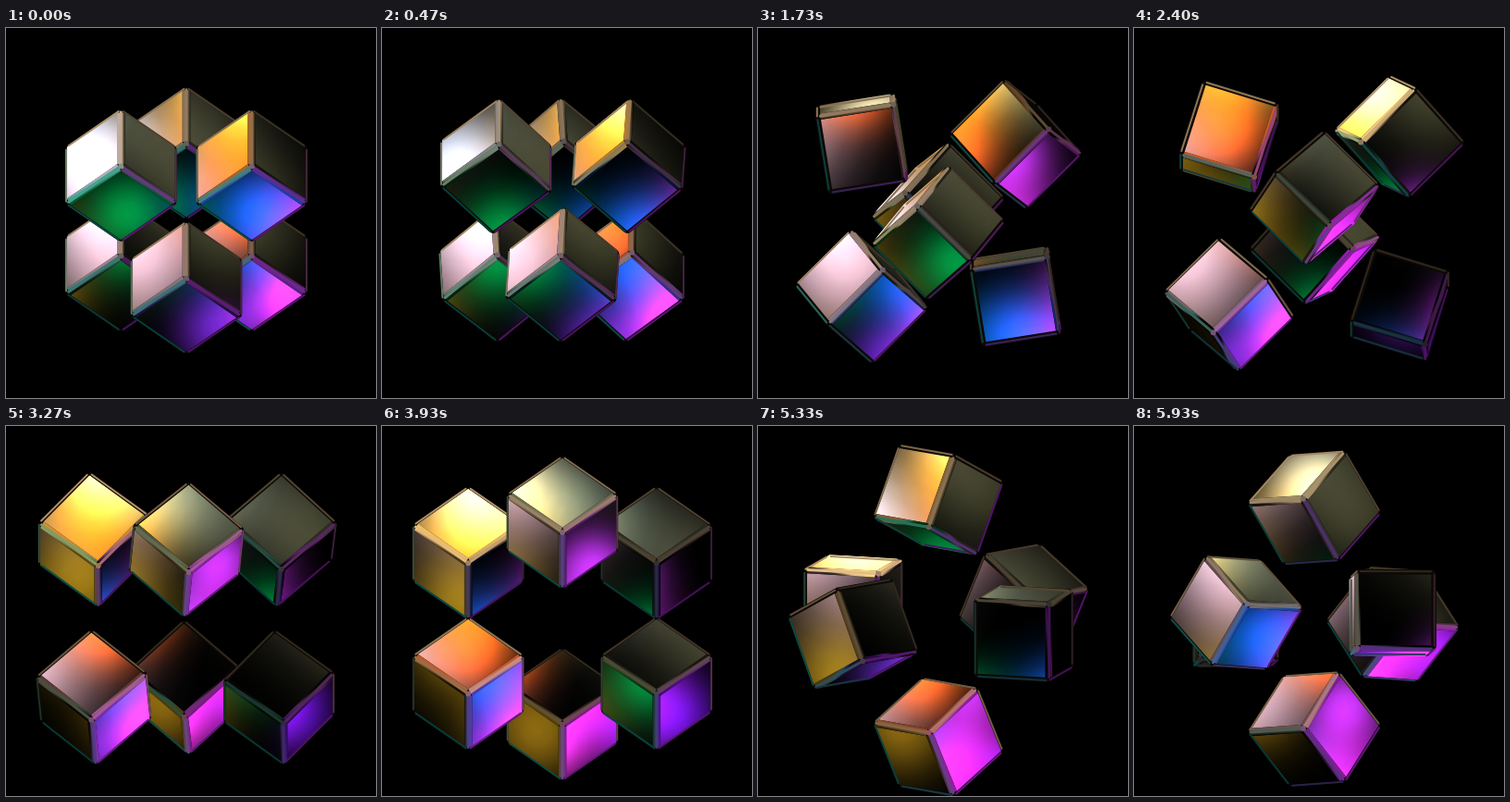
An HTML page with a canvas that plays this animation: 400x400 px, repeating every 6 s.

```html
<!DOCTYPE html>
<html lang="en">
<head>
<meta charset="utf-8">
<title>Cubes</title>
<style>
html, body { margin: 0; width: 100%; height: 100%; overflow: hidden; background: #000; }
canvas { display: block; width: 400px; height: 400px; }
</style>
</head>
<body>
<canvas id="stage" width="400" height="400"></canvas>
<script>
const ctx = document.getElementById('stage').getContext('2d');
const LOOP = 6000, FPS = 15;
const CX = 195, CY = 208, HALF = 44.3, R = 6, IN = HALF - R;
const PARALLAX = 280, SPREAD = 200;

// Axes: A right, P pole, B left; capital is the positive side, small the negative.
const cubes = [
  { at: 'P', spin: 'B' }, { at: 'p', spin: 'b' },
  { at: 'B', spin: 'P' }, { at: 'b', spin: 'P' },
  { at: 'A', spin: 'A' }, { at: 'a', spin: 'a' }
];

const hex = s => [...s].map(c => parseInt(c, 16) * 17);
const light = (x, y, r, color) => ({ x, y, r, color: hex(color) });

// Soft lights around the scene, placed by the direction a surface faces.
const lights = [
  light(-0.82, -0.3, 0.4, 'fcd'),
  light(-1, -0.7, 0.3, 'cde'),
  light(-0.36, -0.85, 0.3, 'f90'),
  light(-0.33, -0.48, 0.2, 'd41'),
  light(-0.35, -1.15, 0.25, 'ffd'),
  light(0, -1, 0.3, '787'),
  light(0.5, -0.75, 0.35, '443'),
  light(0.8, -0.4, 0.3, '332'),
  light(-0.95, 0.4, 0.28, '971'),
  light(-0.68, 0.85, 0.25, '861'),
  light(-0.22, 0.6, 0.22, '094'),
  light(0.28, 0.6, 0.24, '06e'),
  light(0.64, 0.68, 0.3, 'f3f'),
  light(0.45, 0.95, 0.18, 'e3d'),
  light(0.72, 0.25, 0.2, 'b3e'),
  light(1, 0.8, 0.22, '61d'),
  light(0.15, 1.05, 0.2, '62b')
];

const add = (p, q, k = 1) => p.map((v, i) => v + q[i] * k);
const scale = (p, k) => p.map(v => v * k);
const mix = (p, q, k) => p.map((v, i) => v + (q[i] - v) * k);
const cross = (p, q) => [p[1] * q[2] - p[2] * q[1], p[2] * q[0] - p[0] * q[2], p[0] * q[1] - p[1] * q[0]];
const dot = (p, q) => p[0] * q[0] + p[1] * q[1] + p[2] * q[2];
const clamp = v => Math.max(0, Math.min(1, v));
const css = (c, a = 1) => `rgba(${c.map(v => Math.round(255 * clamp(v / 255))).join()},${a})`;
const luma = c => clamp((c[0] * 0.3 + c[1] * 0.59 + c[2] * 0.11) / 255);

// Direction used to look up the lights, shifted by where the cube stands.
const facing = (n, pos) => [n[0] + (pos[0] - CX) / PARALLAX, n[1] + (pos[1] - CY) / PARALLAX];

function sample([x, y]) {
  return lights.reduce((sum, l) =>
    add(sum, l.color, Math.exp(-((x - l.x) ** 2 + (y - l.y) ** 2) / l.r ** 2)), [0, 0, 0]);
}

function rotate(v, axis, angle) {
  const c = Math.cos(angle), s = Math.sin(angle);
  return add(add(scale(v, c), cross(axis, v), s), axis, dot(axis, v) * (1 - c));
}

function trace(points) {
  ctx.beginPath();
  points.forEach(p => ctx.lineTo(p[0], p[1]));
  ctx.closePath();
}

function hull(points) {
  const turn = (o, a, b) => (a[0] - o[0]) * (b[1] - o[1]) - (a[1] - o[1]) * (b[0] - o[0]);
  const half = list => {
    const out = [];
    for (const p of list) {
      while (out.length > 1 && turn(out[out.length - 2], out[out.length - 1], p) <= 0) out.pop();
      out.push(p);
    }
    return out.slice(0, -1);
  };
  const sorted = [...points].sort((a, b) => a[0] - b[0] || a[1] - b[1]);
  return half(sorted).concat(half(sorted.reverse()));
}

// Iridescent bevel: warm above, teal to magenta below.
function rim(n, c) {
  const low = clamp(n[1] * 3 + 0.4);
  const cool = mix([20, 150, 140], [190, 45, 240], clamp(n[0] * 1.5 + 0.5));
  const warm = scale([250, 205, 150], 0.25 + 0.75 * luma(c));
  return mix(warm, scale(cool, 0.5 + 0.5 * luma(c)), low);
}

function stroke(p, q, color, width) {
  ctx.strokeStyle = color;
  ctx.lineWidth = width;
  ctx.beginPath();
  ctx.moveTo(p[0], p[1]);
  ctx.lineTo(q[0], q[1]);
  ctx.stroke();
}

function drawFace(f, pos) {
  const [u, v] = f.sides;
  const mid = add(pos, f.n, HALF);
  trace([[1, 1], [1, -1], [-1, -1], [-1, 1]].map(([i, j]) => add(add(mid, u, IN * i), v, IN * j)));
  ctx.fillStyle = '#000';
  ctx.fill();
  ctx.globalCompositeOperation = 'lighter';
  const [qx, qy] = facing(f.n, pos);
  for (const l of lights) {
    const x = mid[0] + (l.x - qx) * SPREAD, y = mid[1] + (l.y - qy) * SPREAD;
    const g = ctx.createRadialGradient(x, y, 0, x, y, l.r * SPREAD * 2.2);
    for (let i = 0; i <= 8; i++)
      g.addColorStop(i / 8, css(l.color, i < 8 ? Math.exp(-((i / 8 * 2.2) ** 2)).toFixed(3) : 0));
    ctx.fillStyle = g;
    ctx.fill();
  }
  ctx.globalCompositeOperation = 'source-over';
}

function drawEdge(f, g, pos) {
  const w = cross(f.n, g.n);
  const m = scale(add(f.n, g.n), Math.SQRT1_2);
  const base = add(add(pos, f.n, IN), g.n, IN);
  const ends = [add(base, w, IN), add(base, w, -IN)];
  const [p, q] = ends.map(e => add(e, m, R * 0.85));
  if (!g.seen) {
    stroke(p, q, css(scale(rim(m, f.color), 0.7)), 2);
    return;
  }
  const c = mix(f.color, g.color, 0.5);
  const glow = mix(c, rim(m, c), 0.7);
  const a = add(base, f.n, R), b = add(base, g.n, R);
  const grad = ctx.createLinearGradient(a[0], a[1], b[0], b[1]);
  grad.addColorStop(0, css(scale(f.color, 0.6)));
  grad.addColorStop(0.5, css(glow));
  grad.addColorStop(1, css(scale(g.color, 0.6)));
  trace([add(ends[0], f.n, R), add(ends[1], f.n, R), add(ends[1], g.n, R), add(ends[0], g.n, R)]);
  ctx.fillStyle = grad;
  ctx.fill();
  stroke(p, q, css(glow), 3);
}

function drawCube(cube, pos, axes, angle) {
  const spun = {};
  for (const k of 'APB') spun[k] = rotate(axes[k], axes[cube.spin], angle);
  const faces = [];
  for (const k of 'APB') {
    const sides = [...'APB'].filter(o => o !== k).map(o => spun[o]);
    for (const sign of [1, -1]) {
      const n = scale(spun[k], sign);
      faces.push({ k, n, sides, seen: n[2] > 0.01, color: sample(facing(n, pos)) });
    }
  }
  const corners = [];
  for (const i of [IN, -IN]) for (const j of [IN, -IN]) for (const k of [IN, -IN])
    corners.push(add(add(add(pos, spun.A, i), spun.P, j), spun.B, k));
  trace(hull(corners));
  ctx.fillStyle = ctx.strokeStyle = '#0c0906';
  ctx.lineWidth = R * 2;
  ctx.fill();
  ctx.stroke();

  const front = faces.filter(f => f.seen);
  front.forEach(f => drawFace(f, pos));
  front.forEach(f => faces.forEach(g => {
    if (g.k !== f.k && (!g.seen || f.k < g.k)) drawEdge(f, g, pos);
  }));
  if (front.length === 3) {
    const tip = front.reduce((p, f) => add(p, f.n, IN + R * 0.58), pos);
    const color = scale(front.reduce((sum, f) => add(sum, f.color), [0, 0, 0]), 1 / 3);
    stroke(tip, tip, css(mix(color, rim([0, 0, 1], color), 0.5)), 6);
  }
}

function draw(t) {
  const tilt = (43.3 + 24 * t) * Math.PI / 180;
  const open = (1 - Math.cos(0.82 * t)) / 2;
  const c = Math.cos(tilt), s = Math.sin(tilt), h = Math.SQRT1_2;
  const axes = { A: [h, -h * s, h * c], B: [-h, -h * s, h * c], P: [0, c, s] };
  for (const k of 'ABP') axes[k.toLowerCase()] = scale(axes[k], -1);
  ctx.fillStyle = '#000';
  ctx.fillRect(0, 0, 400, 400);
  ctx.lineJoin = ctx.lineCap = 'round';
  cubes
    .map(cube => ({ cube, pos: add([CX, CY, 0], axes[cube.at], 100 + 44 * open) }))
    .sort((p, q) => p.pos[2] - q.pos[2])
    .forEach(({ cube, pos }) => drawCube(cube, pos, axes, open * Math.PI / 2));
}

const start = performance.now();
function tick(now) {
  const ms = Math.max(0, now - start) % LOOP;
  draw(Math.floor(ms * FPS / 1000 + 0.01) / FPS);
  requestAnimationFrame(tick);
}
draw(0);
requestAnimationFrame(tick);
</script>
</body>
</html>
```
